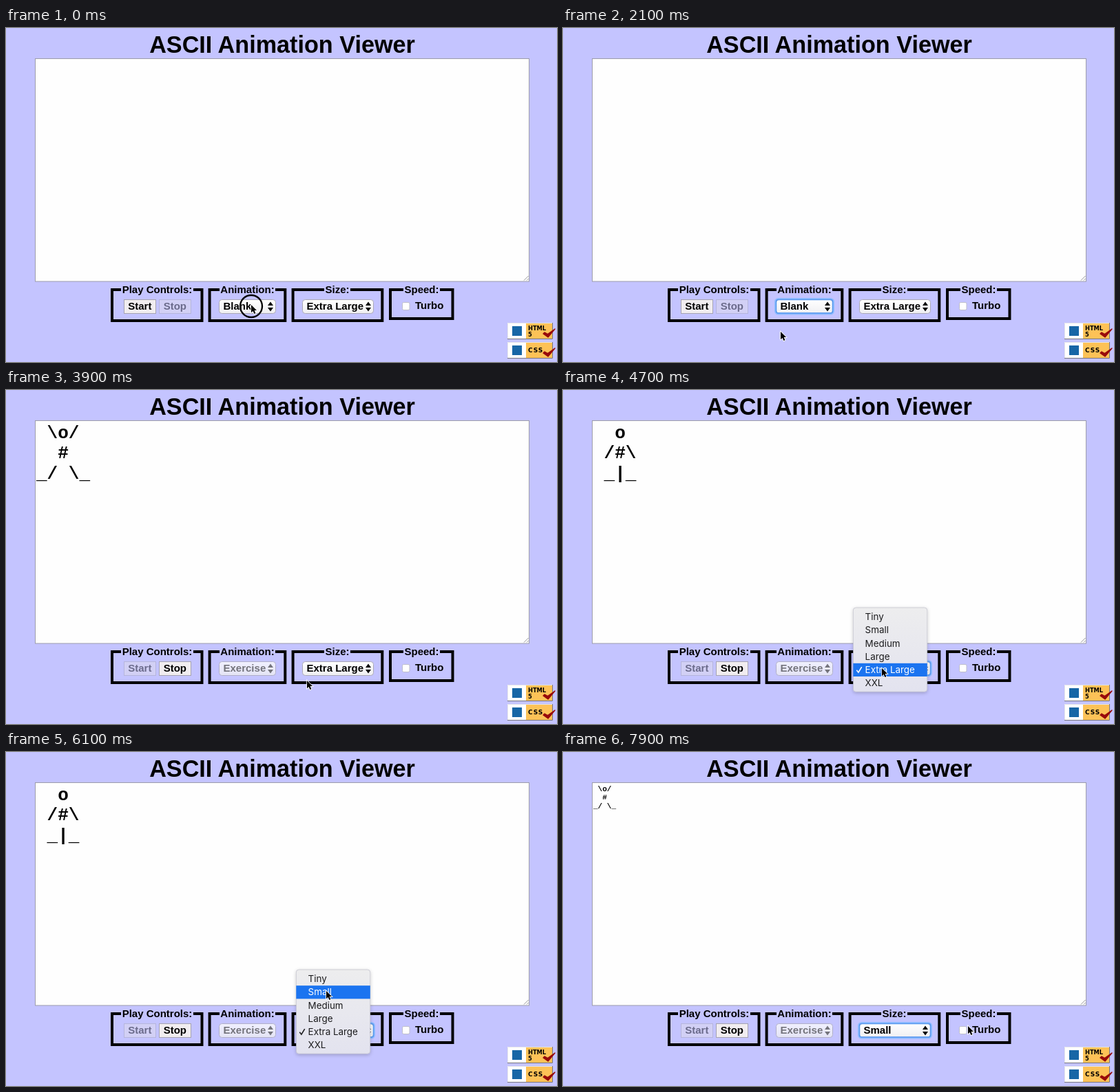
Write an HTML page that moves like this. It is 800 px wide and 485 px high and loops after 8 s.

```html
<!DOCTYPE html>
<html lang="en">
<head>
<meta charset="utf-8">
<title>ASCII Animation Viewer</title>
<style>
  html, body { margin: 0; width: 100%; height: 100%; overflow: hidden; background: #c4c4ff; }
  svg { display: block; width: 800px; height: 485px; }
  text { white-space: pre; }
  .ui { font: bold 15px "Liberation Sans", Arial, sans-serif; }
  .title { font: bold 34.2px "Liberation Sans", Arial, sans-serif; }
  .menu { font: 13.4px Inter, Roboto, sans-serif; }
  .ascii { font-family: "Liberation Mono", "Courier New", monospace; font-weight: bold; }
  .badge { font-family: "DejaVu Sans", sans-serif; font-weight: bold; }
</style>
</head>
<body>
<svg viewBox="0 0 800 485" xmlns="http://www.w3.org/2000/svg">
  <defs>
    <linearGradient id="face" x2="0" y2="1">
      <stop offset="0" stop-color="#fff"/><stop offset="1" stop-color="#efeff2"/>
    </linearGradient>
    <linearGradient id="sheet" x2="0" y2="1">
      <stop offset="0" stop-color="#ededee"/><stop offset="1" stop-color="#e3e3ef"/>
    </linearGradient>
    <filter id="shadow" x="-20%" y="-20%" width="140%" height="140%">
      <feDropShadow dx="0" dy="1.5" stdDeviation="2.5" flood-opacity=".22"/>
    </filter>
  </defs>
  <g id="page"></g>
  <g id="live"></g>
</svg>
<script>
const LOOP = 8000, TICK = 100;
const ROW = 19.2;
const POSES = [["  o", " /#\\", " _|_"], [" \\o/", "  #", "_/ \\_"]];
const ALL_TEXT = [...POSES[0], "=====", ...POSES[1]];

// Moments of the interaction, in ms
const AT = { openAnim: 200, closeAnim: 2100, pick: 2200, start: 3100, openSize: 4300, closeSize: 6300 };
const CLICKS = [0, 1900, 3000, 4200, 6200];

// Pointer tip: time, x, y
const PATH = [
  [0, 356, 402], [300, 356, 402], [900, 346, 405], [1200, 346, 405], [1800, 331, 428],
  [2000, 328, 430], [2100, 316, 441], [2300, 306, 442], [2900, 195, 405], [3200, 195, 405],
  [3900, 437, 422], [4200, 463, 404], [4900, 463, 404], [5100, 462, 400], [5200, 461, 390],
  [6000, 465, 347], [6800, 465, 347], [7700, 588, 398], [8000, 588, 398]
];

const rect = (x, y, w, h, fill, more = "") =>
  `<rect x="${x}" y="${y}" width="${w}" height="${h}" fill="${fill}" ${more}/>`;
const label = (x, y, s, cls = "ui", more = "") =>
  `<text x="${x}" y="${y}" class="${cls}" ${more}>${s}</text>`;
const path = (d, more) => `<path d="${d}" ${more}/>`;

function fieldset(x, right, bottom, name, from, to) {
  return rect(x + 2, 380, right - x - 4, bottom - 382, "none", 'stroke="#000" stroke-width="4"') +
    rect(from, 377, to - from, 6, "#c4c4ff") +
    label((from + to) / 2, 384.7, name, "ui", 'text-anchor="middle"');
}

function badge(y, words) {
  return rect(728, y, 66, 24, "#fff") +
    rect(755, y + 1, 38, 22, "#fdc257") +
    path(`M728.5 ${y + 23.5}V${y + .5}H793`, 'fill="none" stroke="#e4e4ea"') +
    path(`M728 ${y + 23.5}H793.5V${y}`, 'fill="none" stroke="#77757d"') +
    rect(735, y + 5, 14, 14, "#1766a6") + words +
    path(`M780 ${y + 16}L787 ${y + 21}L797 ${y + 9}L786.5 ${y + 16.5}L782 ${y + 14}Z`,
      'fill="#980b0b" stroke="#980b0b" stroke-width="1.4" stroke-linejoin="round"');
}

function button(x, name, on) {
  return `<g opacity="${on ? 1 : .45}">` +
    rect(x + .5, 394.5, 46, 20, on ? "#f1edf0" : "#e4e0ea", 'stroke="#a5a3b0"') +
    label(x + 23.3, 409, name, "ui", 'text-anchor="middle"') + "</g>";
}

function select(x, w, value, focus, on = true) {
  const a = x + w - 8;
  const ring = focus
    ? rect(x - .5, 393.5, w + 1, 21.5, "none", 'rx="4" stroke="#8fbcff" stroke-width="3"') +
      rect(x + .5, 394.5, w - 1, 19.5, "none", 'rx="3" stroke="#5597ee" stroke-width="1.5"')
    : "";
  return rect(x + .5, 394.5, w - 1, 20, "url(#face)", `rx="4" stroke="#aaa8b6" opacity="${on ? 1 : .75}"`) +
    `<g opacity="${on ? 1 : .5}">` + label(x + 6.5, 409, value) +
    path(`M${a - 4} 403l4 -5.5l4 5.5zM${a - 4} 406l4 5.5l4 -5.5z`, "") + "</g>" + ring;
}

function menu(x, y, w, items, checked, hot) {
  const h = items.length * ROW + 7;
  let out = rect(x, y, w, h, "url(#sheet)", 'rx="4" stroke="#b4b4c2" stroke-width=".6" filter="url(#shadow)"');
  items.forEach((name, i) => {
    const top = y + 4 + i * ROW, lit = i === hot, ink = lit ? "#fff" : "#1c1c1e";
    if (lit) out += rect(x, top, w, ROW, "#1b74f0");
    out += label(x + 17.3, top + 14.2, name, "menu", `fill="${ink}"`);
    if (i === checked)
      out += path(`M${x + 5} ${top + 10}l2.6 3.4l4.8 -8`, `fill="none" stroke="${ink}" stroke-width="1.6"`);
  });
  return out;
}

function ascii(lines, size) {
  return lines.map((s, i) =>
    label(44, 47 + size * (.88 + i * 1.133), s, "ascii", `font-size="${size}"`)).join("");
}

function pointer(t) {
  const i = Math.max(1, PATH.findIndex(p => p[0] > t));
  const [t0, x0, y0] = PATH[i - 1], [t1, x1, y1] = PATH[i];
  const k = Math.max(0, (t - t0) / (t1 - t0)), e = k * k * (3 - 2 * k);
  return [x0 + (x1 - x0) * e, y0 + (y1 - y0) * e];
}

const arrow = ([x, y]) =>
  path("M0 0V11.2L2.6 8.9L4.4 13.1L6.4 12.3L4.6 8.1H8Z",
    `transform="translate(${x} ${y})" stroke="#fff" stroke-width="1.6" paint-order="stroke"`);

document.getElementById("page").innerHTML =
  rect(0, 0, 800, 485, "#c4c4ff") +
  label(401, 36, "ASCII Animation Viewer", "title", 'text-anchor="middle"') +
  rect(42.5, 44.5, 717, 323.5, "#fefefe", 'stroke="#9c9caa"') +
  path("M752 366.5l6.5 -6.5M756 366.5l2.5 -2.5", 'stroke="#88888c" stroke-width=".9"') +
  fieldset(152, 286.5, 427, "Play Controls:", 167, 272) +
  fieldset(293.6, 407.3, 427, "Animation:", 310, 391) +
  fieldset(414.6, 548.3, 427, "Size:", 462, 500) +
  fieldset(556, 650.5, 424, "Speed:", 577, 630) +
  rect(575.5, 398.5, 10.5, 11, "#fff", 'rx="2" stroke="#bdbdca"') +
  label(594, 408, "Turbo") +
  badge(428, label(758, 438.5, "HTML", "badge", 'font-size="8.3"') +
    label(758, 447.5, "5", "badge", 'font-size="8.3"')) +
  badge(456, label(758, 471, "CSS", "badge", 'font-size="9" letter-spacing=".9"'));

const live = document.getElementById("live");

function draw(t) {
  const running = t >= AT.start, picked = t >= AT.pick, small = t >= AT.closeSize;
  const tip = pointer(t), lag = pointer(Math.max(0, t - TICK));
  const hotRow = top => Math.floor((lag[1] - top) / ROW);
  let out = "";

  if (running) out += ascii(POSES[Math.floor((t - AT.start) / 250) % 2], small ? 11 : 26);
  else if (picked) out += ascii(ALL_TEXT, 26);

  out += button(171, "Start", !running) + button(222, "Stop", running) +
    select(309, 83, picked ? "Exercise" : "Blank", t >= AT.openAnim && !running, !running) +
    select(430, 104, small ? "Small" : "Extra Large", t >= AT.openSize);

  if (t >= AT.openAnim && t < AT.closeAnim)
    out += menu(300, 392, 88, ["Blank", "Exercise", "Juggler", "Bike", "Dive"], 0, Math.max(0, hotRow(396)));
  if (t >= AT.openSize && t < AT.closeSize)
    out += menu(421.3, 316, 107.5, ["Tiny", "Small", "Medium", "Large", "Extra Large", "XXL"], 4, hotRow(320));

  if (CLICKS.some(c => t >= c && t < c + 200))
    out += `<circle cx="${tip[0]}" cy="${tip[1] + 2}" r="16" fill="none" stroke="#000" stroke-width="2.3"/>`;
  live.innerHTML = out + arrow(tip);
}

let last = -1;
const begin = performance.now();
function frame() {
  const t = Math.floor(((performance.now() - begin) % LOOP) / TICK) * TICK;
  if (t !== last) draw(last = t);
  requestAnimationFrame(frame);
}
frame();
</script>
</body>
</html>
```
